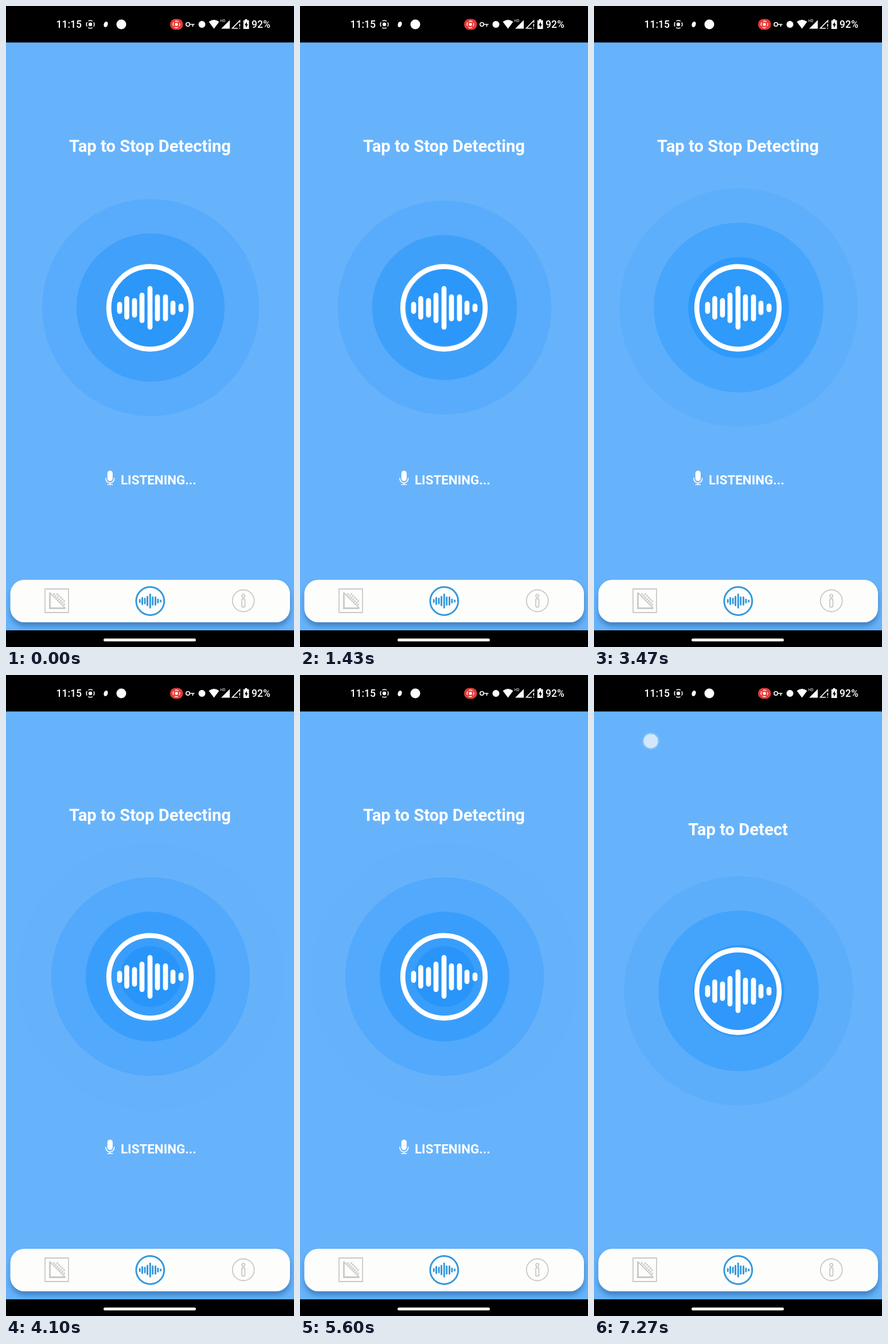
Recreate the animation shown at these times as an HTML page. Size 502 by 1116 pixels, loop 7.31 s.

```html
<!DOCTYPE html>
<html lang="en">
<head>
<meta charset="utf-8">
<title>Sound detector</title>
<style>
  html, body { margin: 0; height: 100%; overflow: hidden; background: #000; }
  svg { display: block; width: 100vw; height: 100vh; font-family: Roboto, sans-serif; }
  .title { font-size: 29.2px; font-weight: 700; text-anchor: middle; }
  .status { font-size: 17.5px; font-weight: 500; }
  .line { fill: none; stroke: #fff; stroke-width: 1.6; }
  .tab { fill: none; stroke: #c9c9c7; stroke-width: 1.8; }
</style>
</head>
<body>
<svg viewBox="0 0 502 1116" fill="#fff">
  <defs>
    <g id="wave" fill="none" stroke-width="8.7" stroke-linecap="round">
      <circle r="71.8"/>
      <path id="bars"/>
    </g>
    <g id="record">
      <circle r="3.2"/>
      <circle r="6.8" fill="none" stroke="#fff" stroke-width="1.6" stroke-dasharray="7.7 2.98" stroke-dashoffset="3.85"/>
    </g>
    <filter id="blur" x="-10%" y="-50%" width="120%" height="200%"><feGaussianBlur stdDeviation="5"/></filter>
    <clipPath id="screen"><path d="M0 63.6H502V1087H0z"/></clipPath>
  </defs>

  <path d="M0 0H502V1116H0z" fill="#000"/>
  <path d="M0 63.6H502V1087H0z" fill="#67b3fb"/>

  <!-- status bar -->
  <g>
    <text class="status" x="87.5" y="38">11:15</text>
    <use href="#record" x="147" y="32"/>
    <ellipse cx="174" cy="32" rx="3.4" ry="5" transform="rotate(20 174 32)"/>
    <circle cx="201" cy="32" r="8.5"/>
    <rect x="286" y="22.5" width="22.5" height="19" rx="9" fill="#e53935"/>
    <use href="#record" transform="translate(297 32) scale(.85)"/>
    <circle class="line" cx="317" cy="32" r="3.2"/>
    <path class="line" d="M320.5 32H328.5M325.5 32V36"/>
    <circle cx="341.5" cy="32" r="6"/>
    <path d="M353.5 27.5Q362.5 20.5 371.5 27.5L362.5 39.5z"/>
    <text x="373.5" y="28" font-size="6.5">HD</text>
    <path d="M390 24.5V39.5H375z"/>
    <path class="line" d="M404 38.7H394.5L407.5 25.5V29M407.3 31V36M407.3 37.8V39.5"/>
    <path d="M416.5 23H420.5V25H423.5V40H413.8V25H416.5z"/>
    <path d="M419.8 27.5L415.8 33.5H418.2V38L421.8 31.8H419.8z" fill="#000"/>
    <text class="status" x="428" y="38">92%</text>
  </g>

  <!-- detector -->
  <g id="detector">
    <g id="rings" fill="#2494f9"></g>
    <use href="#wave" transform="translate(251 525.5)" stroke="#fff"/>
    <text id="title" class="title" x="251" y="254"></text>
  </g>
  <g id="listening">
    <rect x="176.7" y="809" width="9.2" height="18" rx="4.6"/>
    <path class="line" d="M174 821.5V823A7.3 7.3 0 0 0 188.6 823V821.5M181.3 830V833.5M176.5 833.3H186.2"/>
    <text x="200" y="833" font-size="22.4" font-weight="700">LISTENING...</text>
  </g>
  <g id="touch">
    <circle cx="99" cy="115" r="15" opacity=".18"/>
    <circle cx="99" cy="115" r="12.5" fill="#d3e7fc"/>
  </g>

  <!-- tab bar -->
  <g clip-path="url(#screen)">
    <rect x="8" y="1006" width="487" height="74" rx="24.4" fill="#174f8c" opacity=".5" filter="url(#blur)"/>
  </g>
  <rect x="7.5" y="999" width="487.5" height="74" rx="24.4" fill="#fdfdfb"/>
  <path class="tab" d="M68 1015H109V1056H68z"/>
  <path class="tab" d="M76.5 1021V1048.5H103.5" style="stroke-width: 2.8"/>
  <path class="tab" d="M77 1022L103 1048"/>
  <path id="dots" fill="#cfcfcc"/>
  <use href="#wave" transform="translate(251.3 1036) scale(.34)" stroke="#3498db"/>
  <g class="tab">
    <circle cx="413.7" cy="1035.5" r="19"/>
    <circle cx="413.7" cy="1027" r="2.6"/>
    <rect x="411" y="1032" width="5.4" height="14.5" rx="2"/>
  </g>

  <rect x="170" y="1101.2" width="161" height="5" rx="2.5" fill="#f8f8f4"/>
</svg>
<script>
  const LOOP = 7310, STOP = 6267, TOUCH = 7230;
  const PERIOD = 1500, PHASE = 0.15, GAP = 60, WAVES = 4;
  const $ = id => document.getElementById(id);

  // [x, half height] of each sound bar, measured from the icon's centre
  const bars = [[-53, 10.5], [-40.5, 20.5], [-27, 17], [-14, 26.5], [0, 38],
                [13, 23.5], [27, 23.5], [40, 12.5], [54, 7.5]];
  $('bars').setAttribute('d', bars.map(([x, h]) => `M${x} ${4.4 - h}V${h - 4.4}`).join(''));

  // Checkered dots that thin out away from the diagonal
  let dots = '';
  for (let row = 0; row < 7; row++)
    for (let col = row + 1; col < Math.min(row + 5, 8); col++)
      if ((row + col) % 2) dots += `M${79 + col * 3} ${1022.5 + row * 3}h3v3h-3z`;
  $('dots').setAttribute('d', dots);

  const rings = Array.from({ length: WAVES }, () => {
    const ring = document.createElementNS('http://www.w3.org/2000/svg', 'circle');
    ring.setAttribute('cx', 252);
    ring.setAttribute('cy', 525);
    return $('rings').appendChild(ring);
  });

  const show = (id, on) => $(id).setAttribute('visibility', on ? 'visible' : 'hidden');

  function draw(now) {
    const t = now % LOOP;
    const active = t < STOP;
    const step = (Math.min(t, STOP) / PERIOD + PHASE) % 1;
    rings.forEach((ring, i) => {
      const value = i + step;
      ring.setAttribute('r', value * GAP);
      ring.setAttribute('opacity', 1 - value / WAVES);
    });
    $('detector').setAttribute('transform', `translate(0 ${active ? 0 : 25})`);
    $('title').textContent = active ? 'Tap to Stop Detecting' : 'Tap to Detect';
    show('listening', active);
    show('touch', t >= TOUCH);
    requestAnimationFrame(draw);
  }
  draw(performance.now());
</script>
</body>
</html>
```
